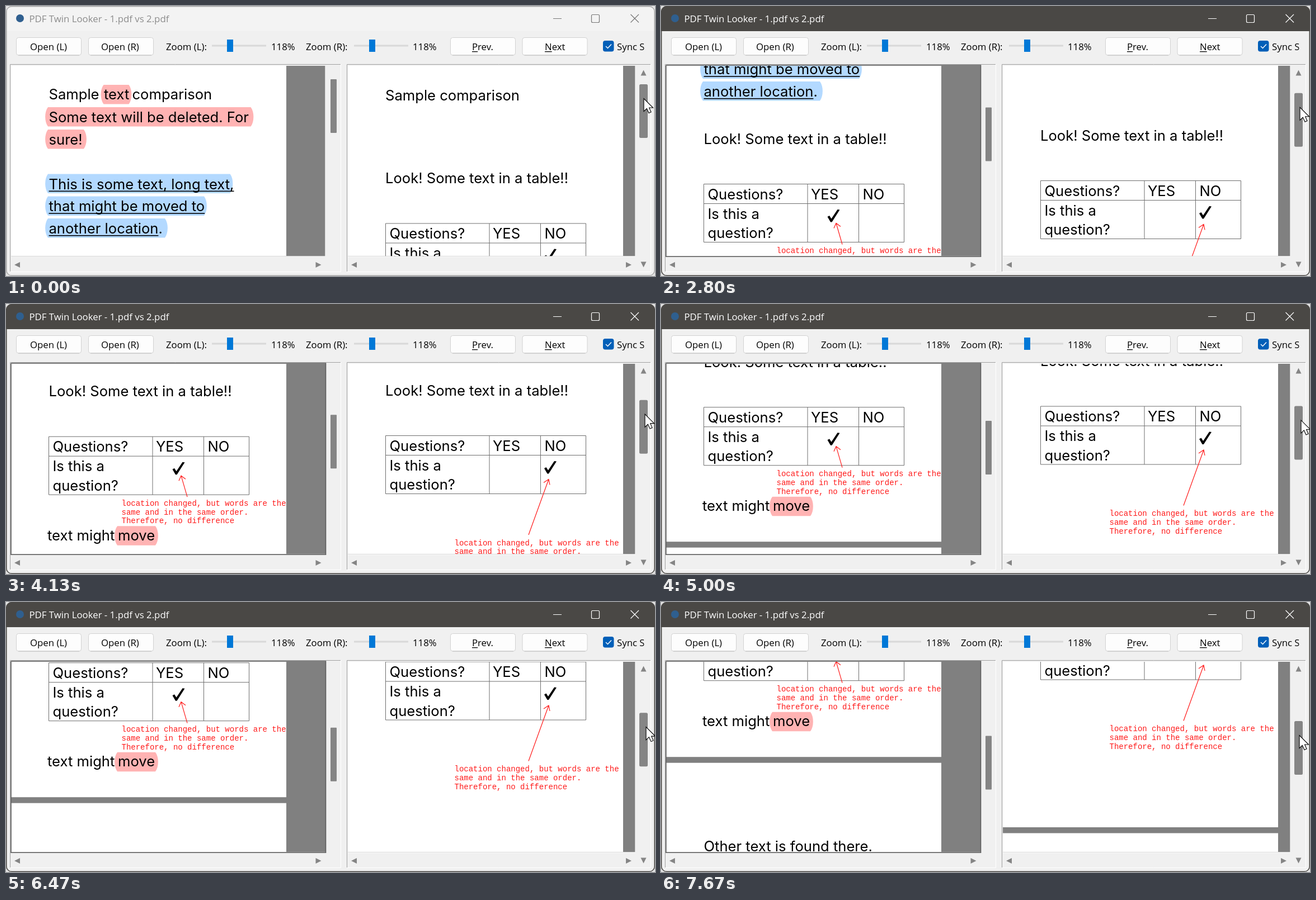
Animation, 1160 px wide and 483 px high, one loop 8000 ms. Source, as an HTML page with a canvas:

```html
<!DOCTYPE html>
<html lang="en">
<head>
<meta charset="utf-8">
<title>PDF Twin Looker</title>
<style>
html, body { margin: 0; width: 100%; height: 100%; overflow: hidden; background: #e4e4e4; }
canvas { display: block; }
</style>
</head>
<body>
<canvas id="stage" width="1160" height="483"></canvas>
<script>
const ctx = document.getElementById('stage').getContext('2d');
const LOOP = 8000;
const UI = '16.8px "Open Sans", sans-serif';
const DOC = '25.6px Inter, sans-serif';
const NOTE = '14px "Liberation Mono", monospace';
const PINK = '#ffb3b3', BLUE = '#b3d9ff', GREY = '#808080', RED = '#ff1a1a';
const PX_PER_THUMB = 4.85;

// [time, scroll of the right page]; the drag moves in hard steps
const STEPS = [
  [0, 0], [1530, 10], [1600, 18.5], [2070, 36], [2530, 58], [2800, 76.5],
  [2870, 87], [3000, 98], [3270, 106], [3330, 113], [3400, 121], [3600, 127],
  [3670, 133], [3730, 139], [4070, 146], [4130, 153.5], [4530, 171.5],
  [4730, 181.5], [4870, 196], [5000, 206], [5070, 211], [5200, 219],
  [5530, 229], [5600, 239], [5730, 249], [5870, 254], [6200, 274],
  [6470, 282], [6870, 295], [7130, 306], [7200, 316], [7330, 331],
  [7530, 344], [7670, 354]
];

function scrollAt(t) {
  let y = 0;
  for (const [at, v] of STEPS) if (t >= at) y = v;
  return y;
}

// the left page joins in once the views are synced
function leftScroll(t, right) {
  if (t < 2070) return 0;
  return right + (t < 2870 ? 168.5 : 172.8);
}

function rect(x, y, w, h, color) {
  ctx.fillStyle = color;
  ctx.fillRect(x, y, w, h);
}

function round(x, y, w, h, r, fill, stroke) {
  ctx.beginPath();
  ctx.roundRect(x, y, w, h, r);
  if (fill) { ctx.fillStyle = fill; ctx.fill(); }
  if (stroke) { ctx.strokeStyle = stroke; ctx.lineWidth = 1; ctx.stroke(); }
}

function lines(color, width, ...paths) {
  ctx.strokeStyle = color;
  ctx.lineWidth = width;
  ctx.beginPath();
  for (const p of paths) {
    ctx.moveTo(p[0], p[1]);
    for (let i = 2; i < p.length; i += 2) ctx.lineTo(p[i], p[i + 1]);
  }
  ctx.stroke();
}

function poly(color, ...p) {
  ctx.fillStyle = color;
  ctx.beginPath();
  for (let i = 0; i < p.length; i += 2) ctx.lineTo(p[i], p[i + 1]);
  ctx.closePath();
  ctx.fill();
}

function text(s, x, y, font, color = '#000') {
  ctx.font = font;
  ctx.fillStyle = color;
  ctx.fillText(s, x, y);
}

function docText(s, x, y, underlined = '') {
  text(s, x, y, DOC);
  if (underlined) rect(x, y + 3, ctx.measureText(underlined).width, 1.6, '#000');
}

function mark(x1, x2, y, color) {
  const h = 34.5, b = 5;
  ctx.fillStyle = color;
  ctx.beginPath();
  ctx.moveTo(x1 + b, y);
  ctx.lineTo(x2 - b, y);
  ctx.bezierCurveTo(x2 + 1.5, y + 8, x2 + 1.5, y + h - 8, x2 - b, y + h);
  ctx.lineTo(x1 + b, y + h);
  ctx.bezierCurveTo(x1 - 1.5, y + h - 8, x1 - 1.5, y + 8, x1 + b, y);
  ctx.fill();
}

function tick(x, y) {
  poly('#000', x, y + 13, x + 3.5, y + 11, x + 7, y + 16.5, x + 18, y,
    x + 22, y + 0.5, x + 8, y + 22.5, x + 5.5, y + 22.5);
}

function table(x, y, tickX) {
  const w = 358, c1 = 185.5, c2 = 277;
  lines('#6e6e6e', 1,
    [x, y, x + w, y, x + w, y + 104, x, y + 104, x, y],
    [x, y + 35, x + w, y + 35],
    [x + c1, y, x + c1, y + 104], [x + c2, y, x + c2, y + 104]);
  docText('Questions?', x + 7, y + 27);
  docText('YES', x + 191.5, y + 27);
  docText('NO', x + 284, y + 27);
  docText('Is this a', x + 7, y + 62);
  docText('question?', x + 7, y + 96.5);
  tick(tickX, y + 45.5);
}

function note(x, y) {
  ['location changed, but words are the', 'same and in the same order.', 'Therefore, no difference']
    .forEach((s, i) => text(s, x, y + i * 15.8, NOTE, RED));
}

function leftPage() {
  mark(169.5, 224.5, 141, PINK);
  mark(70, 442.5, 181, PINK);
  mark(70, 144, 221, PINK);
  docText('Sample', 76.5, 167);
  docText('text', 175, 167);
  docText('comparison', 225.5, 167);
  docText('Some text will be deleted. For', 76.5, 207.5);
  docText('sure!', 76.5, 247.5);
  mark(70, 405.5, 300.5, BLUE);
  mark(70, 359, 340.5, BLUE);
  mark(70, 289, 380, BLUE);
  const moved = ['This is some text, long text,', 'that might be moved to', 'another location'];
  moved.forEach((s, i) => docText(s + (i === 2 ? '.' : ''), 76.5, 327.5 + i * 39.7, s));
  docText('Look! Some text in a table!!', 76.5, 491.5);

  const top = 563.5;
  table(76.5, top, 297.5);
  lines(RED, 1.2, [324, top + 108, 313, top + 70],
    [309, top + 79, 313, top + 70, 321, top + 76]);
  note(206.5, top + 123.5);
  mark(194, 272, top + 160, PINK);
  docText('text might', 74, top + 185.5);
  docText('move', 200, top + 185.5);
  rect(0, top + 240.5, 600, 10.5, GREY);
  docText('Other text is found there.', 76.5, top + 409.5);
}

function rightPage() {
  docText('Sample comparison', 678, 169);
  docText('Look! Some text in a table!!', 678, 317);
  const top = 389;
  table(678.5, top, 962);
  lines(RED, 1.2, [934, top + 177.5, 970, top + 78],
    [961, top + 84, 970, top + 78, 972, top + 88]);
  note(801.5, top + 196);
  rect(600, top + 368, 560, 10.5, GREY);
}

function pane(x, y, w, h, pageX, pageW, scroll, page) {
  ctx.save();
  ctx.beginPath();
  ctx.rect(x, y, w, h);
  ctx.clip();
  rect(x, y, w, h, GREY);
  ctx.beginPath();
  ctx.rect(pageX, y, pageW, h);
  ctx.clip();
  rect(pageX, y, pageW, h, '#fff');
  ctx.translate(0, -scroll);
  page();
  ctx.restore();
}

function arrow(x, y, dx, dy) {
  poly('#858585', x + 5 * dx - 5 * dy, y + 5 * dy - 5 * dx,
    x + 5 * dx + 5 * dy, y + 5 * dy + 5 * dx, x - 5 * dx, y - 5 * dy);
}

function button(x, label, tx, hot) {
  round(x + 0.5, 56.5, 116, 31.5, 4, '#fdfdfd', '#d2d2d2');
  lines('#c0c0c0', 1, [x + 4, 88, x + 113, 88]);
  text(label, tx, 79, UI);
  if (hot) rect(tx, 81, ctx.measureText(hot).width, 1.3, '#000');
}

function zoom(label, tx, x, vx) {
  text(label, tx, 79, UI);
  rect(x, 69.5, 97, 3, '#d9d9d9');
  rect(x + 27, 60, 11, 22, '#0078d7');
  text('118%', vx, 79, UI);
}

function titleBar(active) {
  const ink = active ? '#fff' : '#8c8c8c';
  rect(0, 0, 1160, 45, active ? '#4a4845' : '#f3f3f3');
  ctx.fillStyle = '#2f5f8f';
  ctx.beginPath();
  ctx.arc(25, 22, 7, 0, 7);
  ctx.fill();
  text('PDF Twin Looker - 1.pdf vs 2.pdf', 41.5, 28.5, UI, ink);
  const pen = active ? '#fff' : '#777';
  lines(pen, 1.2, [978, 22.5, 993, 22.5], [1116.5, 15, 1131, 29.5], [1131, 15, 1116.5, 29.5]);
  ctx.beginPath();
  ctx.roundRect(1046.5, 15.5, 14, 14, 2);
  ctx.stroke();
}

function toolbar() {
  button(18, 'Open (L)', 43, '');
  button(147, 'Open (R)', 170, '');
  zoom('Zoom (L):', 286, 368, 474);
  zoom('Zoom (R):', 536, 622, 727);
  button(794, 'Prev.', 833, 'P');
  button(922.5, 'Next', 963, 'N');
  round(1067, 62, 19.5, 19.5, 4, '#005fb8');
  lines('#fff', 1.4, [1072, 72, 1075.5, 75.5, 1082, 68.5]);
  ctx.save();
  ctx.beginPath();
  ctx.rect(1090, 50, 50.5, 45);
  ctx.clip();
  text('Sync Scroll', 1092, 79, UI);
  ctx.restore();
}

function frame(x, w) {
  lines('#a0a0a0', 1, [x + 0.5, 475, x + 0.5, 104.5, x + w, 104.5]);
  lines('#fff', 1, [x, 475.5, x + w + 0.5, 475.5, x + w + 0.5, 104]);
}

function cursor(x, y) {
  ctx.beginPath();
  const p = [0, 0, 0, 23, 5.3, 18, 9, 26, 13, 24.2, 9.6, 16.5, 16.5, 16.5];
  for (let i = 0; i < p.length; i += 2) ctx.lineTo(x + p[i], y + p[i + 1]);
  ctx.closePath();
  ctx.fillStyle = '#fff';
  ctx.fill();
  ctx.strokeStyle = '#000';
  ctx.lineWidth = 1.1;
  ctx.stroke();
}

function cursorX(t) {
  if (t < 530) return 1140;
  if (t < 4870) return 1142;
  return t < 7330 ? 1144 : 1141;
}

function draw(t) {
  const active = t >= 530;
  const right = scrollAt(t);
  const left = leftScroll(t, right);
  rect(0, 0, 1160, 483, '#e4e4e4');
  ctx.save();
  ctx.beginPath();
  ctx.roundRect(0, 0, 1160, 483, 10);
  ctx.clip();
  rect(0, 0, 1160, 483, '#f0f0f0');
  titleBar(active);
  toolbar();

  frame(7, 591);
  frame(609, 543);
  pane(9, 107, 561.5, 340.5, 9, 492, left, leftPage);
  pane(611, 107, 513.5, 340.5, 611, 492, right, rightPage);
  if (active) {
    rect(570, 107, 2, 340, GREY);
    lines('#5c5c5c', 1.6, [9, 106, 571.5, 106, 571.5, 448.3, 9, 448.3, 9, 106]);
  }
  lines('#fafafa', 1, [611, 448.5, 1125, 448.5]);

  round(580, 131 + left / PX_PER_THUMB, 11, 96, 1, '#858585');
  round(1132, 140 + right / PX_PER_THUMB, 15, 96, 2.5, '#858585');
  for (const x of [20, 622]) arrow(x, 463, 1, 0);
  for (const x of [558.5, 1113]) arrow(x, 463, -1, 0);
  arrow(1139.5, 119.5, 0, 1);
  arrow(1139.5, 462.5, 0, -1);
  ctx.restore();

  ctx.beginPath();
  ctx.roundRect(0.75, 0.75, 1158.5, 481.5, 9.5);
  ctx.strokeStyle = active ? '#4a4845' : '#a8a8a8';
  ctx.lineWidth = 1.5;
  ctx.stroke();
  cursor(cursorX(t), 165.5 + right / PX_PER_THUMB);
}

function tickFrame(now) {
  draw(now % LOOP);
  requestAnimationFrame(tickFrame);
}
draw(0);
requestAnimationFrame(tickFrame);
</script>
</body>
</html>
```
